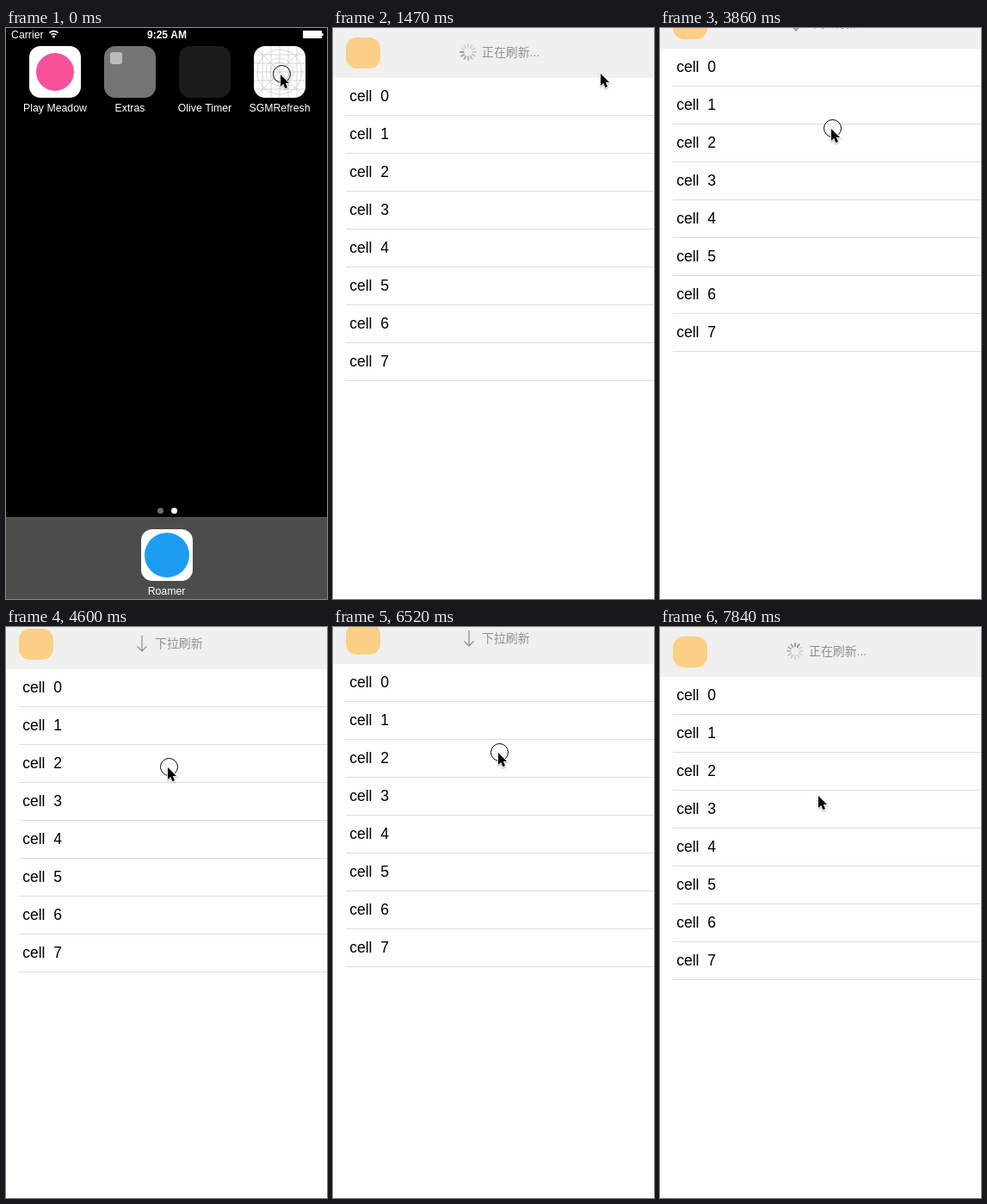
An HTML page with a canvas that plays this animation: 373 by 663 pixels, repeating every 7990 ms.

```html
<!DOCTYPE html>
<html lang="en">
<head>
<meta charset="utf-8">
<title>Pull to refresh</title>
<style>
html, body { margin: 0; width: 100%; height: 100%; overflow: hidden; background: #000; }
canvas { display: block; width: 373px; height: 663px; }
</style>
</head>
<body>
<canvas id="stage" width="373" height="663"></canvas>
<script>
const W = 373, H = 663, LOOP = 7990, STEPS = 54;
const ZOOM_START = 2, ZOOM_STEPS = 4, TABLE_START = 9, FIRST_LOADED = 13;
const PRESS = 18, RELEASE = 51, SETTLED = 52;
const REST = -4, LOADING_HEIGHT = 57, DRAG_LAG = .75;
const SANS = '"Liberation Sans", Arial, "Noto Sans CJK SC", "Noto Sans CJK", sans-serif';
const ctx = document.getElementById('stage').getContext('2d');

const smooth = u => u * u * (3 - 2 * u);
const easeOut = (u, power = 2) => 1 - (1 - u) ** power;
const clamp = u => Math.min(1, Math.max(0, u));
const mix = (a, b, u) => a + (b - a) * u;

const HAND = { x: 319, y: 54 };
const MOVES = [
  { from: 8, to: 14, x: 206, y: 46, ease: smooth },
  { from: 19, to: 23, x: 202, y: 104, ease: smooth },
  { from: 25, to: 36, x: 184.5, y: 178.4, ease: easeOut },
  { from: 38.4, to: 43.5, x: 192, y: 146, ease: smooth },
  { from: 45, to: 51, x: 184, y: 196, ease: smooth },
];

function handAt(step) {
  return MOVES.reduce((hand, { from, to, x, y, ease }) => {
    const u = ease(clamp((step - from) / (to - from)));
    return { x: mix(hand.x, x, u), y: mix(hand.y, y, u) };
  }, HAND);
}

// The list follows the finger at half speed and a little late.
function headerHeight(step) {
  if (step < FIRST_LOADED || step >= SETTLED) return LOADING_HEIGHT;
  return Math.max(REST, Math.round(handAt(step - DRAG_LAG).y / 2 - 31));
}

function box(x, y, w, h, color, radius = 0) {
  ctx.fillStyle = color;
  ctx.beginPath();
  ctx.roundRect(x, y, w, h, radius);
  ctx.fill();
}

function disc(x, y, r, color) {
  ctx.fillStyle = color;
  ctx.beginPath();
  ctx.arc(x, y, r, 0, 7);
  ctx.fill();
}

function ring(x, y, r) {
  ctx.beginPath();
  ctx.arc(x, y, r, 0, 7);
  ctx.stroke();
}

function path(points) {
  ctx.beginPath();
  points.forEach(([x, y]) => ctx.lineTo(x, y));
}

function line(...points) {
  path(points);
  ctx.stroke();
}

function label(text, x, y, size, color, align = 'left', weight = 400) {
  ctx.font = `${weight} ${size}px ${SANS}`;
  ctx.textAlign = align;
  ctx.fillStyle = color;
  ctx.fillText(text, x, y);
}

function statusBar(color) {
  label('Carrier', 6, 11.5, 12.3, color);
  label('9:25 AM', 187, 11.5, 12, color, 'center', 700);
  ctx.strokeStyle = color;
  ctx.lineWidth = 1.7;
  for (const r of [4.2, 7.4]) {
    ctx.beginPath();
    ctx.arc(55.5, 11, r, -2.33, -.81);
    ctx.stroke();
  }
  disc(55.5, 10, 1.5, color);
  box(345, 3, 22, 9, color, 1);
  box(367, 6, 1.7, 3, color, 1);
}

function tile(x, y, color) {
  box(x, y, 60, 60, color, 13);
}

function templateIcon(x, y) {
  tile(x, y, '#fff');
  ctx.save();
  ctx.clip();
  ctx.translate(x, y);
  ctx.strokeStyle = '#c4c4c4';
  ctx.lineWidth = .7;
  for (let d = 10; d < 60; d += 10) {
    line([d, 0], [d, 60]);
    line([0, d], [60, d]);
  }
  line([0, 0], [60, 60]);
  line([60, 0], [0, 60]);
  for (const r of [11, 16, 26]) ring(30, 30, r);
  ctx.restore();
}

function home() {
  tile(27, 21, '#fff');
  disc(57, 51, 22, '#f9509a');
  tile(114, 21, '#757575');
  box(121, 28, 14, 14, '#bcbcbc', 3);
  tile(201, 21, '#1b1b1b');
  templateIcon(288, 21);
  ['Play Meadow', 'Extras', 'Olive Timer', 'SGMRefresh'].forEach((name, i) =>
    label(name, 57 + 87 * i, 97, 12.3, '#fff', 'center'));
  disc(179.5, 560.5, 3.5, '#6c6c6c');
  disc(195.5, 560.5, 3.5, '#fff');
  box(0, 568, W, 95, '#4c4c4c');
  box(0, 568, W, 1, '#5e5e5e');
  tile(157, 582, '#fff');
  disc(187, 612, 26, '#1d9df2');
  label('Roamer', 186.5, 658, 12.3, '#fff', 'center');
  statusBar('#fff');
}

function launchScreen() {
  box(0, 0, W, H, '#fefefe');
  statusBar('#000');
  label('SGMRefresh', 186.5, 233.5, 34.6, '#000', 'center', 700);
  label('Copyright (c) 2015年 陶砚禾. All rights reserved.', 191, 639.5, 15, '#000', 'center');
}

// The app grows out of its icon while the home screen flies past and fades.
function opening(step) {
  const u = clamp((step - ZOOM_START) / ZOOM_STEPS);
  const across = easeOut(u, 2.4), down = easeOut(u, 2.16);
  const zoom = 1 + across * 3;
  ctx.save();
  ctx.globalAlpha = 1 - across;
  ctx.translate(318, 51);
  ctx.scale(zoom, zoom);
  ctx.translate(-318, -51);
  home();
  ctx.restore();
  if (u === 0) return;
  const left = Math.round(mix(288, 0, across)), top = Math.floor(mix(21, 0, across));
  const right = Math.ceil(mix(348, W, across)), bottom = Math.round(mix(81, H, down));
  ctx.save();
  ctx.globalAlpha = Math.min(1, across * 2);
  ctx.translate(left, top);
  ctx.scale((right - left) / W, (bottom - top) / H);
  launchScreen();
  ctx.restore();
}

function arrow(y, up) {
  const s = up ? -1 : 1;
  ctx.strokeStyle = '#969696';
  ctx.lineWidth = 1.4;
  line([158, y - 9 * s], [158, y + 9 * s]);
  line([152.5, y + 3.5 * s], [158, y + 9 * s], [163.5, y + 3.5 * s]);
}

function spinner(y, step) {
  ctx.lineWidth = 2;
  ctx.lineCap = 'round';
  for (let i = 0; i < 12; i++) {
    const a = i * Math.PI / 6, c = Math.cos(a), s = Math.sin(a);
    const age = (step * 2 - i + 12) % 12;
    const tone = 150 + Math.min(age, 7) * 9;
    ctx.strokeStyle = `rgb(${tone},${tone},${tone})`;
    line([157 + 5.5 * c, y + 5.5 * s], [157 + 9 * c, y + 9 * s]);
  }
  ctx.lineCap = 'butt';
}

function header(top, step) {
  const loading = step < FIRST_LOADED || step >= RELEASE;
  const ready = top > LOADING_HEIGHT;
  const y = top - 29;
  box(0, 0, W, top + 1, '#f0f0f0');
  box(15, top - 46, 40, 36, '#fbcf85', 13);
  if (loading) spinner(y, step);
  else arrow(y, ready);
  label(loading ? '正在刷新...' : ready ? '释放刷新' : '下拉刷新', 173, y + 5, 13.9, '#909090');
}

function table(step) {
  const top = headerHeight(step);
  box(0, 0, W, H, '#fefefe');
  if (top > 0) header(top, step);
  for (let i = 0; i < 8; i++) {
    const y = top + 44 * i;
    label('cell  ' + i, 19.2, y + 28, 17.5, '#000');
    box(15, y + 44, W - 15, 1, '#dedede');
  }
}

function pointer(step) {
  const hand = handAt(step), x = Math.round(hand.x), y = Math.round(hand.y);
  if (step === 0 || (step >= PRESS && step < RELEASE)) {
    ctx.strokeStyle = '#000';
    ctx.lineWidth = 1;
    ring(x + 1.5, y - .5, 10);
  }
  ctx.save();
  ctx.translate(x, y);
  path([[0, 0], [0, 14], [3.2, 11], [5.4, 16.2], [8, 15.1], [5.8, 10], [10, 10]]);
  ctx.closePath();
  ctx.shadowColor = 'rgba(0,0,0,.35)';
  ctx.shadowBlur = 2;
  ctx.shadowOffsetY = 1;
  ctx.strokeStyle = '#fff';
  ctx.lineWidth = 1.6;
  ctx.stroke();
  ctx.shadowColor = 'transparent';
  ctx.fillStyle = '#000';
  ctx.fill();
  ctx.restore();
}

function draw(now) {
  // The small lead keeps rounded step times on the right side of the boundary.
  const step = Math.min(STEPS - 1, Math.floor((now % LOOP + 8) / (LOOP / STEPS)));
  box(0, 0, W, H, '#000');
  if (step < TABLE_START) opening(step);
  else table(step);
  pointer(step);
  requestAnimationFrame(() => draw(performance.now() - start));
}

const start = performance.now();
draw(0);
</script>
</body>
</html>
```
